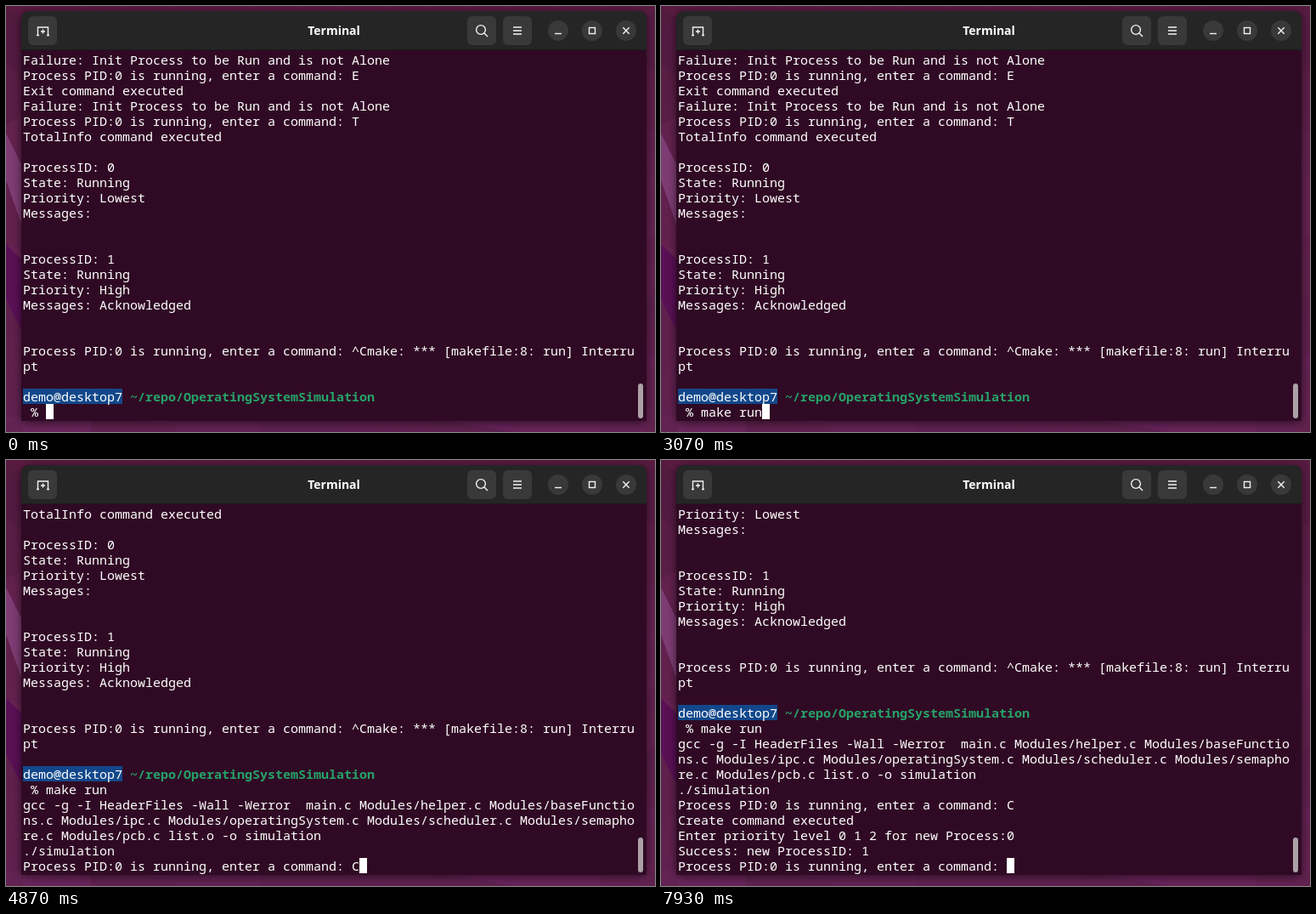
An HTML page that plays this animation: 764x501 px, repeating every 8 s.

```html
<!DOCTYPE html>
<html lang="en">
<head>
<meta charset="utf-8">
<title>Terminal</title>
<style>
  html, body { margin: 0; width: 100%; height: 100%; overflow: hidden; background: #5b1c42; }
  #stage { position: relative; width: 764px; height: 501px; overflow: hidden; }
  svg { position: absolute; left: 0; top: 0; }
  #screen {
    position: absolute; left: 20px; top: 54px; width: 722px; height: 432px;
    font: 500 15px/18px "Noto Sans Mono", "DejaVu Sans Mono", monospace;
    color: #fff; white-space: pre; font-variant-ligatures: none;
  }
  .row { height: 18px; }
  .user { display: inline-block; height: 18px; background: #12488b; vertical-align: top; }
  .path { color: #26a269; font-weight: bold; }
  #caret { position: absolute; top: 468px; width: 9px; height: 18px; background: #fff; }
  .title { font: bold 14px "Noto Sans", "Open Sans", sans-serif; }
</style>
</head>
<body>
<div id="stage">
  <svg width="764" height="501" viewBox="0 0 764 501">
    <defs>
      <linearGradient id="wall" x2="0" y2="1">
        <stop stop-color="#5a1b41"/><stop offset="1" stop-color="#68235a"/>
      </linearGradient>
      <filter id="blur" x="-5%" y="-5%" width="110%" height="110%">
        <feGaussianBlur stdDeviation="5"/>
      </filter>
    </defs>
    <rect width="764" height="501" fill="url(#wall)"/>
    <g id="facets"></g>
    <path d="M0 150L20 190V262L0 205Z" fill="#7d3c74"/>
    <path d="M0 280L20 300V385L0 345Z" fill="#5a1055"/>
    <rect x="17" y="7" width="738" height="484" rx="10" opacity=".5" filter="url(#blur)"/>
    <path d="M18 488V16Q18 6 28 6H744Q754 6 754 16V488Z" fill="#300a24"/>
    <path d="M18 52V16Q18 6 28 6H744Q754 6 754 16V52Z" fill="#252525"/>
    <path d="M18 51.5H754" stroke="#1b1b1b"/>
    <g id="buttons" fill="#393939"></g>
    <g fill="none" stroke="#f2f2f2" stroke-width="1.4">
      <path d="M37.5 34V25H49.5V34M36 34.5H39M48 34.5H51M43.5 27.5V32.5M41 30H46"/>
      <circle cx="559" cy="28" r="5.4"/><path d="M563 32L567 36"/>
      <path d="M597 25H607M597 29H607M597 33H607"/>
      <path d="M646 32.5H654"/>
      <rect x="686.5" y="25.5" width="7" height="7"/>
      <path d="M726.3 25.3L733.7 32.7M733.7 25.3L726.3 32.7"/>
    </g>
    <text class="title" x="386" y="34" text-anchor="middle" fill="#fff">Terminal</text>
    <rect x="744" y="444" width="6" height="41" rx="3" fill="#aaa1a7"/>
  </svg>
  <div id="screen"></div>
  <div id="caret"></div>
  <svg id="pointer" width="764" height="501">
    <g id="beam" fill="none">
      <path d="M-2 -4H2M0 -4V4M-2 4H2" stroke="#000" stroke-width="2.6"/>
      <path d="M-1.5 -4H1.5M0 -4V4M-1.5 4H1.5" stroke="#fff" stroke-width="1.2"/>
    </g>
  </svg>
</div>
<script>
const LOOP = 8000, ROWS = 24, COLUMNS = 80, CELL = 9, LEFT = 20;
const BLINK = 600, BLINK_LEAD = 70;
const ASK = "Process PID:0 is running, enter a command: ";
const FAIL = "Failure: Init Process to be Run and is not Alone\n";
const USER = "demo@desktop7", PATH = "~/repo/OperatingSystemSimulation";
const byId = id => document.getElementById(id);

const info = (id, priority, message) =>
  `ProcessID: ${id}\nState: Running\nPriority: ${priority}\nMessages: ${message}\n\n\n`;

// Each event holds all text so far and the time of the last key press.
const events = [];
let text = "", keyTime = 0;
function print(time, added) {
  text += added;
  events.push({ time, text, keyTime });
}
function press(time, added) {
  keyTime = time;
  print(time, added);
}
function type(time, word, gap) {
  [...word].forEach((letter, i) => press(time + i * gap, letter));
}
function erase(time) {
  text = text.slice(0, -1);
  press(time, "");
}

print(0, FAIL + ASK + "E\nExit command executed\n" +
  FAIL + ASK + "T\nTotalInfo command executed\n\n" +
  info(0, "Lowest", "") + info(1, "High", "Acknowledged") +
  ASK + "^Cmake: *** [makefile:8: run] Interrupt\n\n" +
  `${USER} ${PATH}\n % `);
type(2200, "make run", 124);
press(3270, "\ngcc -g -I HeaderFiles -Wall -Werror  main.c Modules/helper.c " +
  "Modules/baseFunctions.c Modules/ipc.c Modules/operatingSystem.c " +
  "Modules/scheduler.c Modules/semaphore.c Modules/pcb.c list.o -o simulation\n");
print(3530, "./simulation\n" + ASK);
press(4870, "C");
press(5070, "\nCreate command executed\nEnter priority level 0 1 2 for new Process:");
press(5870, "0");
erase(6330);
press(6930, "0");
press(7200, "\nSuccess: new ProcessID: 1\n" + ASK);
press(7930, "");

function rowHtml(line) {
  const html = line.startsWith(USER)
    ? `<span class="user">${USER}</span> <span class="path">${PATH}</span>` : line;
  return `<div class="row">${html}</div>`;
}

const wrap = line => line.match(new RegExp(`.{1,${COLUMNS}}`, "g")) || [""];

function drawScreen(event) {
  const rows = event.text.split("\n").flatMap(wrap).slice(-ROWS);
  byId("screen").innerHTML = rows.map(rowHtml).join("");
  byId("caret").style.left = LEFT + rows.at(-1).length * CELL + "px";
}

function drawCaret(t, keyTime) {
  const phase = Math.floor((t - keyTime + BLINK_LEAD) / BLINK);
  byId("caret").style.visibility = phase % 2 ? "hidden" : "visible";
}

// The pointer enters in four hops, nudges up, and hides when typing starts.
function drawPointer(t) {
  const hop = Math.min(3, Math.max(0, Math.floor((t - 530) / 66.6))) / 3;
  const x = 163 - 26 * hop, y = t < 1200 ? 487 - 12 * hop : 468;
  byId("pointer").style.visibility = t >= 530 && t < 2200 ? "visible" : "hidden";
  byId("beam").setAttribute("transform", `translate(${x} ${y})`);
}

function drawFacets() {
  let seed = 7;
  const random = () => (seed = seed * 16807 % 2147483647) / 2147483647;
  const facet = (x, y, w, h) => {
    const light = 20 + 10 * random(), lean = 40 * (random() - .5);
    return `<path d="M${x} ${y}l${w} ${lean}v${h}l${-w} ${-lean}z"
      fill="hsl(${314 + 8 * random()} 46% ${light}%)" opacity=".45"/>`;
  };
  let html = "";
  for (let y = 0; y < 501; y += 70) html += facet(0, y, 20, 70) + facet(750, y, 14, 70);
  for (let x = 0; x < 764; x += 100) html += facet(x, 485, 100, 40);
  byId("facets").innerHTML = html;
}

function drawButtons() {
  const square = x => `<rect x="${x}" y="12" width="34" height="34" rx="6"/>`;
  const disc = x => `<circle cx="${x}" cy="29" r="12"/>`;
  byId("buttons").innerHTML =
    [26, 543, 585].map(square).join("") + [650, 690, 730].map(disc).join("");
}

let shown;
const start = performance.now();
function frame() {
  const t = (performance.now() - start) % LOOP;
  const event = events.findLast(e => e.time <= t);
  if (event !== shown) drawScreen(shown = event);
  drawCaret(t, event.keyTime);
  drawPointer(t);
  requestAnimationFrame(frame);
}
drawFacets();
drawButtons();
frame();
</script>
</body>
</html>
```
